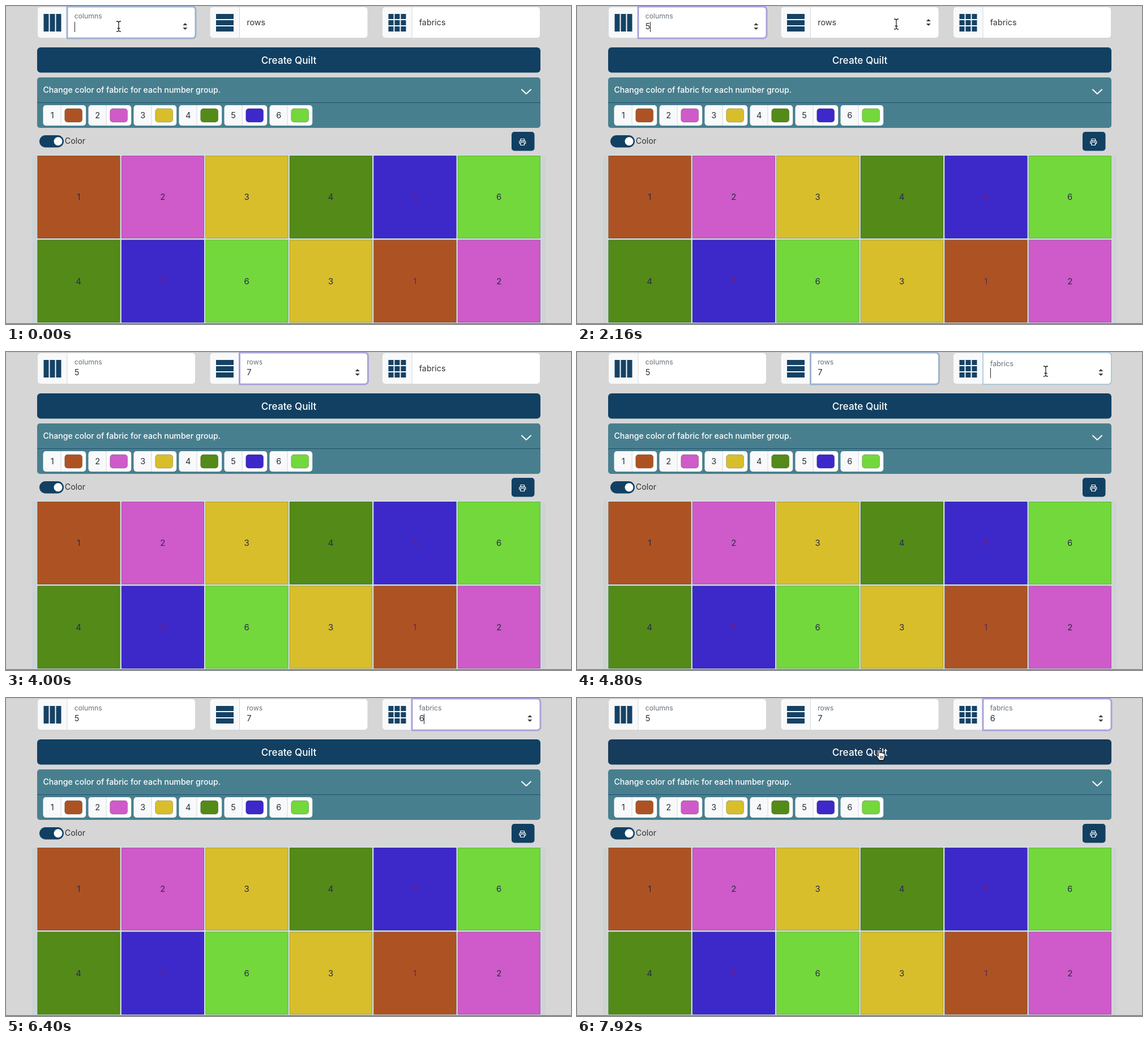
These frames come from a looping animation (998x561 px, 8000 ms). An HTML page with a canvas:

```html
<!DOCTYPE html>
<html lang="en">
<head>
<meta charset="utf-8">
<title>Quilt planner</title>
<style>
  html, body { margin: 0; width: 100%; height: 100%; overflow: hidden; background: #d6d6d6; }
  canvas { display: block; width: 998px; height: 561px; }
</style>
</head>
<body>
<canvas id="stage" width="998" height="561"></canvas>
<script>
const ctx = document.getElementById('stage').getContext('2d');
const LOOP = 8000, STEP = 80;
const NAVY = [17, 64, 98], NAVY_HOVER = [23, 59, 91];
const BLUE_RING = [158, 178, 206], PURPLE_RING = [169, 163, 218];
const FABRICS = ['#ad5323', '#cf5ac9', '#d8be2b', '#538a18', '#3d28ca', '#73d83b'];
const QUILT = [[1, 2, 3, 4, 5, 6], [4, 5, 6, 3, 1, 2]];

// focus / blur / typed are times in ms; `settle` is when the ring reaches its full colour
const FIELDS = [
  { x: 56, label: 'columns', value: '5', focus: -STEP * 2, typed: 880, blur: 2480, settle: 480, icon: [3, 1] },
  { x: 360.5, label: 'rows', value: '7', focus: 2480, typed: 3440, blur: 4800, settle: 2960, icon: [1, 3] },
  { x: 665, label: 'fabrics', value: '6', focus: 4800, typed: 6400, blur: LOOP + STEP, settle: 5280, icon: [3, 3] }
];
const CARET = [[0, 480], [880, 1440], [1920, 2960], [3440, 4000], [4480, 5280], [5760, 6240], [6400, 6960], [7440, 7920]];
const MOVES = [
  { show: 0, start: 0, end: 1, hide: 880, from: [199, 36], to: [199, 36] },
  { show: 1440, start: 1360, end: 2160, hide: 3440, from: [199, 36], to: [564, 32] },
  { show: 4160, start: 4080, end: 4640, hide: 6400, from: [564, 32], to: [828, 34] },
  { show: 7120, start: 7040, end: 7920, hide: LOOP, from: [828, 34], to: [536, 99] }
];

const clamp = v => Math.max(0, Math.min(1, v));
const ease = v => v * v * (3 - 2 * v);
const mix = (a, b, p) => a + (b - a) * p;
const rgb = (a, b = a, p = 0) => `rgb(${a.map((v, i) => Math.round(mix(v, b[i], p)))})`;

function rect(x, y, w, h, color) {
  ctx.fillStyle = color;
  ctx.fillRect(x, y, w, h);
}

function box(x, y, w, h, r, color) {
  ctx.beginPath();
  ctx.roundRect(x, y, w, h, r);
  ctx.fillStyle = color;
  ctx.fill();
}

function text(str, x, y, size, color, align = 'left', weight = 400) {
  ctx.font = `${weight} ${size}px Inter, "Liberation Sans", sans-serif`;
  ctx.textAlign = align;
  ctx.fillStyle = color;
  ctx.fillText(str, x, y);
}

function path(points, close) {
  ctx.beginPath();
  points.forEach(([x, y]) => ctx.lineTo(x, y));
  if (close) ctx.closePath();
}

function mouseAt(t) {
  const m = MOVES.find(m => t >= m.show && t < m.hide);
  if (!m) return null;
  const p = ease(clamp((t - m.start) / (m.end - m.start)));
  return { x: mix(m.from[0], m.to[0], p), y: mix(m.from[1], m.to[1], p) };
}

const overField = (f, m) => m && m.y < 56 && m.x > f.x + 53 && m.x < f.x + 278;
const overButton = m => m && m.y > 73 && m.y < 117;

function drawSpinner(x, y) {
  ctx.fillStyle = '#3c3c3c';
  for (const s of [-1, 1]) {
    path([[x - 4, y + 2 * s], [x + 4, y + 2 * s], [x, y + 6 * s]], true);
    ctx.fill();
  }
}

function drawRing(f, t) {
  const on = t >= f.focus && t < f.blur;
  const fading = t >= f.blur && t < f.blur + STEP;
  if (!on && !fading) return;
  const starting = t < f.focus + STEP;
  ctx.beginPath();
  ctx.roundRect(f.x + 52, 1, 227, 56, [1, 6, 6, 1]);
  ctx.lineWidth = starting ? 1.5 : 3;
  ctx.strokeStyle = starting ? '#a3c3d6' : rgb(t >= f.settle && on ? PURPLE_RING : BLUE_RING);
  ctx.stroke();
}

function drawField(f, t, mouse) {
  const x = f.x, left = x + 65;
  const focused = t >= f.focus && t < f.blur;
  box(x, 2, 52, 54, [5, 0, 0, 5], '#f8f9fa');
  box(x + 52, 2, 226, 54, [0, 5, 5, 0], '#fff');
  rect(x + 51.5, 2, 1, 54, '#d3d7dc');

  const [cols, rows] = f.icon;
  const w = (31 - 2 * (cols - 1)) / cols, h = (31 - 2 * (rows - 1)) / rows;
  for (let c = 0; c < cols; c++)
    for (let r = 0; r < rows; r++)
      rect(x + 10.5 + c * (w + 2), 14 + r * (h + 2), w, h, '#154264');

  drawRing(f, t);

  // the label floats up on focus
  const lift = t < f.focus ? 0 : t < f.focus + STEP ? .78 : 1;
  text(f.label, left - .3, mix(34.3, 22.3, lift), 14.4 * mix(1, .85, lift), lift ? '#68727a' : '#30363b');

  const typed = t >= f.typed;
  if (typed) text(f.value, left - .3, 41.4, 14.6, '#2b3035');
  if (focused && CARET.some(([a, b]) => t >= a && t < b))
    rect(Math.round(left + (typed ? 8 : -.5)), 28, 1, 18, '#222');
  if (focused || overField(f, mouse)) drawSpinner(x + 260.3, lift ? 36 : 29);
}

function drawButton(hover) {
  box(55, 73, 889, 44.5, 6, rgb(NAVY, NAVY_HOVER, hover));
  text('Create Quilt', 499.5, 102, 17.2, '#fff', 'center', 500);
}

function drawPanel() {
  box(55, 126, 889, 89, 5, '#487f8f');
  rect(55, 170, 889, 1, '#22516a');
  text('Change color of fabric for each number group.', 65.5, 153.4, 14.1, '#fff', 'left', 500);
  path([[911, 147.5], [919, 155], [927, 147.5]]);
  ctx.strokeStyle = '#fff';
  ctx.lineWidth = 2;
  ctx.lineCap = ctx.lineJoin = 'round';
  ctx.stroke();

  FABRICS.forEach((color, i) => {
    const x = 65.7 + i * 80;
    box(x, 175, 75.5, 36, 5, '#fff');
    box(x, 175, 31.5, 36, [5, 0, 0, 5], '#f8f9fa');
    rect(x + 31, 175, 1, 36, '#d3d7dc');
    box(x + 38, 181, 31, 24, 5, color);
    ctx.strokeStyle = 'rgba(60,60,60,.3)';
    ctx.lineWidth = 1;
    ctx.stroke();
    text(i + 1, x + 16, 198.3, 14.6, '#2b3035', 'center');
  });
}

function drawTools() {
  box(59, 228, 43, 21.5, 10.75, rgb(NAVY));
  box(84.5, 231.2, 15, 15, 7.5, '#fff');
  text('Color', 103.7, 243.4, 14.3, '#2f3336');

  box(893, 222, 40.5, 33.5, 5, rgb(NAVY));
  ctx.strokeStyle = '#fff';
  ctx.lineWidth = 1.2;
  ctx.strokeRect(909, 234.5, 6.5, 3.5);
  ctx.beginPath();
  ctx.roundRect(906.8, 238, 11, 5, 1.5);
  ctx.stroke();
  box(909, 240.5, 6.5, 5, 0, rgb(NAVY));
  ctx.stroke();
}

function drawQuilt() {
  box(46, 263, 907, 310, 8, 'rgba(178,200,208,.25)');
  box(54, 262, 891, 310, 4, '#cfdfe3');
  QUILT.forEach((row, r) => row.forEach((n, c) => {
    const x = 55.5 + c * 148.5, y = 264 + r * 148.4;
    box(x, y, 146, 146, 1, FABRICS[n - 1]);
    ctx.strokeStyle = 'rgba(20,50,60,.22)';
    ctx.lineWidth = 1;
    ctx.strokeRect(x + .5, y + .5, 145, 145);
    const ink = n === 5 ? '#6d2084' : n === 1 && r ? '#5c2b5c' : '#292a4b';
    text(n, x + 72.7, y + 78.4, 15, ink, 'center');
  }));
  rect(0, 558.8, 998, 1, '#c9d6d9');
  rect(0, 559.8, 998, 1.2, '#4c7987');
}

function drawBeam(x, y) {
  const trace = () => {
    ctx.beginPath();
    for (const s of [-1, 1]) {
      ctx.moveTo(x - 3.5, y + 9 * s);
      ctx.quadraticCurveTo(x, y + 9 * s, x, y + 6.5 * s);
      ctx.quadraticCurveTo(x, y + 9 * s, x + 3.5, y + 9 * s);
    }
    ctx.moveTo(x, y - 7);
    ctx.lineTo(x, y + 7);
    ctx.moveTo(x - 2, y + 3.5);
    ctx.lineTo(x + 2, y + 3.5);
  };
  trace();
  ctx.strokeStyle = 'rgba(255,255,255,.8)';
  ctx.lineWidth = 3;
  ctx.stroke();
  trace();
  ctx.strokeStyle = '#222';
  ctx.lineWidth = 1.3;
  ctx.stroke();
}

function outline(fill, stroke) {
  ctx.lineJoin = 'round';
  ctx.lineWidth = 1.3;
  ctx.fillStyle = fill;
  ctx.strokeStyle = stroke;
  ctx.fill();
  ctx.stroke();
}

function drawArrow(x, y) {
  path([[0, -8], [0, 7], [3.5, 4], [6, 9.5], [8.5, 8.3], [6, 3], [10.5, 3]].map(([a, b]) => [x + a, y + b]), true);
  outline('#111', '#fff');
}

function drawHand(x, y) {
  ctx.save();
  ctx.translate(x, y);
  ctx.beginPath();
  ctx.moveTo(-4, 4);
  ctx.lineTo(-4, -7);
  ctx.quadraticCurveTo(-2.5, -10.5, -1, -7);
  ctx.lineTo(-1, -2);
  for (const [right, top] of [[2, -3.2], [5, -2.2], [8, -1]]) {
    ctx.quadraticCurveTo(right - 1.5, top - 1.6, right, top + 1);
  }
  ctx.lineTo(7.5, 5);
  ctx.lineTo(5.5, 11);
  ctx.lineTo(-2, 11);
  ctx.lineTo(-7, 3.5);
  ctx.quadraticCurveTo(-8, .5, -5.5, 1.5);
  ctx.closePath();
  outline('#fff', '#111');
  ctx.lineWidth = 1;
  for (const k of [-.2, 2, 4.2]) {
    ctx.beginPath();
    ctx.moveTo(k, 3.5);
    ctx.lineTo(k, 7.5);
    ctx.stroke();
  }
  ctx.restore();
}

function drawMouse(m) {
  if (!m) return;
  if (overButton(m)) drawHand(m.x, m.y);
  else if (FIELDS.some(f => overField(f, m))) drawBeam(m.x, m.y);
  else drawArrow(m.x, m.y);
}

function draw(now) {
  const t = Math.floor((now % LOOP) / STEP) * STEP;
  const mouse = mouseAt(t);
  rect(0, 0, 998, 561, '#d6d6d6');
  rect(0, 0, 998, 1, '#c6c7c8');
  rect(0, 0, 1, 561, '#cbcbcb');
  FIELDS.forEach(f => drawField(f, t, mouse));
  drawButton(overButton(mouse) ? clamp((mouse.y - 73) / 15) : 0);
  drawPanel();
  drawTools();
  drawQuilt();
  drawMouse(mouse);
}

let origin = null;
function tick(now) {
  if (origin === null) origin = now;
  draw(now - origin);
  requestAnimationFrame(tick);
}
draw(0);
requestAnimationFrame(tick);
</script>
</body>
</html>
```
